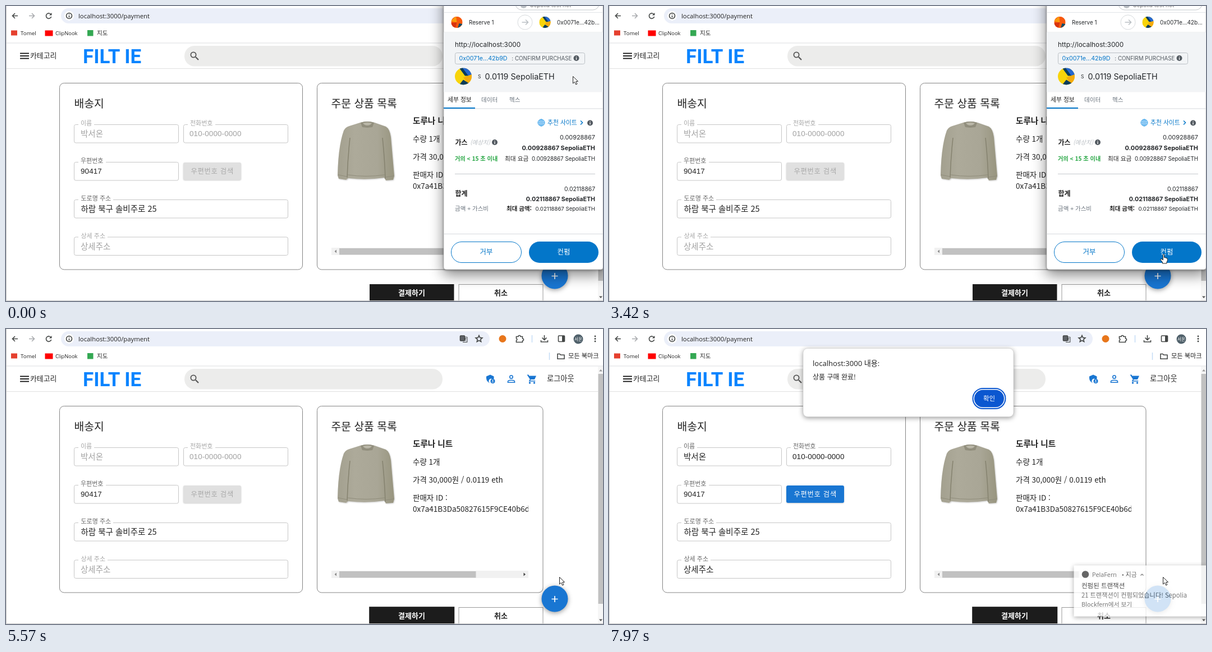
These frames come from a looping animation (1064x526 px, 8 s). An HTML page:

```html
<!DOCTYPE html>
<html lang="ko">
<head>
<meta charset="utf-8">
<title>Payment</title>
<style>
html, body { margin: 0; width: 100%; height: 100%; overflow: hidden; background: #fff; }
svg { display: block; width: 100vw; height: 100vh; }
text { font: 11px 'Noto Sans CJK KR', 'Noto Sans KR', 'Noto Sans CJK JP', sans-serif; fill: #222; white-space: pre; }
.ui { font-family: 'Open Sans', 'Noto Sans CJK KR', 'Noto Sans CJK JP', sans-serif; }
.wal { font-family: Inter, 'Noto Sans CJK KR', 'Noto Sans CJK JP', sans-serif; fill: #24272a; }
.num { font: 13.4px 'Liberation Sans', Arial, sans-serif; letter-spacing: .125px; }
.title { font-size: 19.3px; font-weight: 300; }
.item { font-size: 13.5px; font-weight: 300; }
.val { font-size: 14.5px; }
.lab { fill: #666; }
.b { font-weight: 700; }
.mid { text-anchor: middle; }
.end { text-anchor: end; }
.line { fill: none; stroke: #444746; stroke-width: 1.6; }
.box { fill: none; stroke: #c6c6c6; }
.soft { filter: drop-shadow(0 2px 4px #0006); }
.deep { filter: drop-shadow(0 1px 2px #0005) drop-shadow(0 9px 12px #0007); }

/* one loop is 8 s, so 1% is 80 ms */
.an { animation: 8s linear infinite; }
#cursor { animation-name: travel; }
#arrow { animation-name: arrow; }
#hand { animation-name: hand; }
#confirm { animation-name: confirm; }
#popup { animation-name: close; transform-origin: 923px 49px; }
#details { animation-name: details; }
#veil { animation-name: veil; }
#pay { animation-name: focus; }
.von { animation-name: valueOn; }
.lon { animation-name: labelOn; }
.bon { animation-name: buttonOn; }
.ton { animation-name: captionOn; }
#alert { animation-name: alert; }
#note { animation-name: note; }
.spoke { fill: #f6851b; animation: spoke 1s linear infinite; }

@keyframes travel {
  0%, 6.6% { transform: translate(1010px, 125px); animation-timing-function: ease-in-out; }
  16.25%, 17.1% { transform: translate(991px, 381px); animation-timing-function: ease-out; }
  21.875% { transform: translate(993px, 444px); }
  25.25%, 27.7% { transform: translate(992px, 454px); }
  29.4%, 69.6% { transform: translate(987px, 442px); }
  69.625%, 88.6% { transform: translate(986px, 442px); }
  88.625%, 100% { transform: translate(987px, 442px); }
}
@keyframes arrow { 0%, 40.99% { opacity: 1; } 41%, 62.49% { opacity: 0; } 62.5%, 100% { opacity: 1; } }
@keyframes hand { 0%, 40.99% { opacity: 0; } 41%, 62.49% { opacity: 1; } 62.5%, 100% { opacity: 0; } }
@keyframes confirm {
  0%, 11.8% { opacity: 1; } 14.4%, 40.1% { opacity: .26; }
  42.7%, 56.25% { opacity: 1; } 58.5%, 100% { opacity: .35; }
}
@keyframes veil { 0%, 56.24% { opacity: 0; } 58%, 100% { opacity: 1; } }
@keyframes details { 0%, 60.9% { opacity: 1; } 61%, 99.9% { opacity: 0; } 100% { opacity: 1; } }
@keyframes close {
  0%, 62.3% { opacity: 1; transform: none; }
  63.375% { opacity: .5; transform: scale(.982); }
  63.99% { opacity: .22; transform: scale(.972); }
  64%, 100% { opacity: 0; transform: scale(.972); }
}
@keyframes focus { 0%, 62.49% { stroke-width: 0; } 62.5%, 100% { stroke-width: 1.6px; } }
@keyframes valueOn { 0%, 93.62% { fill: #a2a2a2; } 93.63%, 100% { fill: #222; } }
@keyframes labelOn { 0%, 93.62% { fill: #a6a6a6; } 93.63%, 100% { fill: #666; } }
@keyframes buttonOn { 0%, 93.62% { fill: #e0e0e0; } 93.63%, 100% { fill: #1976d2; } }
@keyframes captionOn { 0%, 93.62% { fill: #a8a8a8; } 93.63%, 100% { fill: #fff; } }
@keyframes alert { 0%, 93.62% { opacity: 0; } 95.5%, 100% { opacity: 1; } }
@keyframes note {
  0%, 96.2% { opacity: 0; transform: translateX(70px); animation-timing-function: ease-out; }
  99.6%, 100% { opacity: .8; transform: none; }
}
@keyframes spoke { from { opacity: 1; } to { opacity: .03; } }
</style>
</head>
<body>
<svg viewBox="0 0 1064 526">
<defs>
  <clipPath id="round"><circle r="15"/></clipPath>
  <clipPath id="list"><rect x="720" y="190" width="211" height="150"/></clipPath>
  <clipPath id="panelClip"><path id="panel" d="M780-120H1064V466Q1064 470 1060 470H785Q780 470 780 465Z"/></clipPath>
  <linearGradient id="wool">
    <stop offset="0" stop-color="#a3a08f"/><stop offset=".3" stop-color="#adaa9a"/>
    <stop offset=".7" stop-color="#a9a696"/><stop offset="1" stop-color="#98957f"/>
  </linearGradient>
  <g id="sun" clip-path="url(#round)">
    <rect x="-15" y="-15" width="30" height="30" fill="#f8d40a"/>
    <path d="M-3-16 16-16 16-3 8-1Z" fill="#2467d1"/>
    <path d="M-8-16-2-16 9-1 3-1Z" fill="#0b3c5c"/>
    <path d="M0 2 16-4 16 12 8 13Z" fill="#f5ab0c"/>
    <path d="M-8 16 0 6 11 13 6 16Z" fill="#0b3c5c"/>
  </g>
  <g id="ember" clip-path="url(#round)">
    <rect x="-15" y="-15" width="30" height="30" fill="#f7590f"/>
    <path d="M-16-3-2-16 0 1Z" fill="#fa9a0c"/>
    <path d="M-16 2 0 0-4 16-16 16Z" fill="#d8330f"/>
    <path d="M2 16 6 3 16 5Z" fill="#0f4e6b"/>
  </g>
  <g id="info">
    <circle r="5" fill="#535a61"/><path d="M0-.8V3M0-3V-1.8" stroke="#fff" stroke-width="1.3"/>
  </g>
</defs>

<rect width="1064" height="526" fill="#fff"/>

<!-- browser bars -->
<g>
  <g class="line">
    <path d="M21 17.5H11.5M16 13l-4.5 4.5 4.5 4.5"/>
    <path d="M41 17.5h9.5M46 13l4.5 4.5-4.5 4.5" stroke="#a9abae"/>
    <path d="M80.3 15.3A4.7 4.7 0 1 0 80.7 19"/>
  </g>
  <path d="M81.5 12V16.5H77Z" fill="#444746"/>
  <rect x="98" y="4" width="764" height="27" rx="13.5" fill="#ebeff9"/>
  <circle cx="112.5" cy="17.5" r="8.5" fill="#fff"/>
  <circle cx="112.5" cy="17.5" r="5" class="line"/>
  <path d="M112.5 17V20.5M112.5 14.3v1.3" class="line"/>
  <text class="ui" x="129" y="21.5" style="font-size:11.3px">localhost:3000/payment</text>

  <g class="line">
    <rect x="809.5" y="12" width="8" height="9" rx="1" fill="#5f6368"/>
    <path d="M818 14.5h4v9h-8M816 17.5h5M818.5 16v1.5q-.5 2.500-2.500 4M817 18q1 2 3.500 3.500" stroke-width="1"/>
    <path d="M843 11.5l1.700 3.900 4.200.4-3.200 2.800 1 4.100-3.700-2.200-3.700 2.200 1-4.100-3.200-2.800 4.200-.4Z"/>
    <path d="M909.5 13.5h3.500a2 2 0 0 1 4 0h3.500v3.500a2 2 0 0 1 0 4v2.500h-11v-3a2 2 0 0 0 0-3.800Z"/>
    <path d="M959.5 11v8M955.5 15.5l4 4 4-4M953.5 20v3h12v-3"/>
    <rect x="984.5" y="12" width="11" height="10.5" rx="1"/>
    <path d="M983 44.5h4l1.500 1.800h6.500v7h-12Z"/>
  </g>
  <rect x="991" y="12" width="4.5" height="10.5" fill="#444746"/>
  <circle cx="885" cy="17.5" r="6.5" fill="#e8761b"/>
  <path d="M937.5 11v13M968.5 42v13" stroke="#c4dcf5" stroke-width="1.5"/>
  <circle cx="1020" cy="18" r="8.5" fill="#50616b"/>
  <text class="mid" x="1020" y="21" style="font-size:7.5px;fill:#fff">서온</text>
  <g fill="#444746"><circle cx="1050" cy="13" r="1.4"/><circle cx="1050" cy="17.5" r="1.4"/><circle cx="1050" cy="22" r="1.4"/></g>

  <rect x="9" y="43.5" width="11" height="9" fill="#e5402f"/>
  <text class="ui" x="26" y="51.5" style="font-size:9.8px">Tomel</text>
  <rect x="69.5" y="43.5" width="14" height="10" fill="#f00"/>
  <text class="ui" x="88" y="51.5" style="font-size:9.3px">ClipNook</text>
  <rect x="145" y="43" width="10.5" height="10.5" fill="#34a853"/>
  <text x="162" y="52" style="font-size:10.5px">지도</text>
  <text x="1002" y="52" style="font-size:11.2px">모든 북마크</text>
  <path d="M0 66H1064" stroke="#dcdde0"/>
</g>

<!-- shop header -->
<g>
  <path d="M25 84.5h16M25 89h16M25 93.5h16" stroke="#222" stroke-width="1.8"/>
  <text x="43" y="93.3" style="font-size:12.9px">카테고리</text>
  <text x="137" y="102" style="font:700 35px Roboto,sans-serif;fill:#0a84ff">FILT IE</text>
  <rect x="318" y="71" width="460" height="36.5" rx="18" fill="#ececeb"/>
  <path d="M338 91l5 5" stroke="#555" stroke-width="2.2"/>
  <circle cx="334" cy="87" r="4.6" fill="none" stroke="#555" stroke-width="1.8"/>
  <g fill="#1976d2">
    <path d="M856 84.5l7-3 6.500 3v4.500h-3.500a4 4 0 0 0-3 7.500q-6.500-2-7-8.500Z"/>
    <circle cx="867.5" cy="93" r="4"/>
    <path d="M928.5 81.5h3l.8 2h12.700l-3 6.500h-6.800l-1 2h9v1.500h-11.500l2-4Z"/>
    <circle cx="933.5" cy="96" r="1.7"/><circle cx="941.5" cy="96" r="1.7"/>
  </g>
  <circle cx="867.5" cy="91.7" r="1.1" fill="#fff"/><path d="M865.3 95q2.200-2.400 4.400 0" fill="#fff"/>
  <circle cx="900.5" cy="85.5" r="2.7" fill="none" stroke="#1976d2" stroke-width="1.6"/>
  <path d="M894.5 95.2v-1.500q0-2.500 6-2.500t6 2.500v1.500Z" fill="none" stroke="#1976d2" stroke-width="1.6"/>
  <text x="964" y="92.5" style="font-size:13.2px">로그아웃</text>
  <path d="M0 111.5H1055" stroke="#e0e0e0"/>
</g>

<!-- address card -->
<rect x="95.5" y="137.5" width="433" height="332.5" rx="8" fill="#fff" stroke="#858585"/>
<text class="title" x="121.5" y="180.5">배송지</text>
<g class="box">
  <rect x="121.5" y="211.5" width="186" height="32.5" rx="3"/>
  <rect x="316.5" y="211.5" width="186" height="32.5" rx="3"/>
  <rect x="121.5" y="278.5" width="186" height="32.5" rx="3"/>
  <rect x="121.5" y="345.5" width="381" height="32.5" rx="3"/>
  <rect x="121.5" y="412" width="381" height="32.5" rx="3"/>
</g>
<path d="M129 211.5h28M324 211.5h49M129 278.5h49M129 345.5h62M129 412h52" stroke="#fff" stroke-width="3"/>
<text class="an lon" x="133" y="213">이름</text>
<text class="an lon" x="328" y="213">전화번호</text>
<text class="lab" x="133" y="280">우편번호</text>
<text class="lab" x="133.5" y="347">도로명 주소</text>
<text class="an lon" x="133.5" y="414">상세 주소</text>
<text class="val an von" x="133" y="233">박서온</text>
<text class="num an von" x="327" y="232">010-0000-0000</text>
<text class="num" x="133" y="299">90417</text>
<text class="val" x="133.5" y="367">하람 북구 솔비주로 25</text>
<text class="val an von" x="133" y="433.5">상세주소</text>
<rect class="an bon" x="316" y="279" width="103" height="31" rx="3" style="filter:drop-shadow(0 1px 1px #0003)"/>
<text class="mid an ton" x="367.7" y="298.5" style="font-size:12.3px;letter-spacing:.75px">우편번호 검색</text>

<!-- order card -->
<rect x="554.5" y="137.5" width="402.5" height="332.5" rx="8" fill="#fff" stroke="#858585"/>
<text class="title" x="579.5" y="180.5">주문 상품 목록</text>
<g style="filter:drop-shadow(1px 1px 1px #0003)">
  <path d="M631 208Q644 204 657 208L677 215Q684 219 686 234L692 303 690 310 677 311 674 306Q642 311 610 307L606 310 593 308 591 302Q592 250 602 222 605 216 612 214Z" fill="url(#wool)"/>
  <path d="M632 208Q644 204 656 208L653 216 644 217 635 216Z" fill="#918e7d"/>
  <path d="M636 209Q644 206 652 209 649 213 644 213 639 213 636 209Z" fill="#b9b6a7"/>
  <path d="M613 235Q609 272 608 306M671 235Q675 274 676 308" fill="none" stroke="#85826f" stroke-width="1.5"/>
  <path d="M609 301Q642 306 675 301M592 301l15 3M677 305l14-2" fill="none" stroke="#8f8c7a"/>
</g>
<g clip-path="url(#list)">
  <text class="b" x="725" y="209.5" style="font-size:14.6px">도루나 니트</text>
  <text class="item" x="725" y="242">수량 1개</text>
  <text class="item" x="725" y="274">가격 30,000원 / 0.0119 eth</text>
  <text class="item" x="725" y="306">판매자 ID :</text>
  <text class="item" x="725" y="326">0x7a41B3Da50827615F9CE40b6d</text>
</g>
<rect x="580" y="431" width="351" height="13" fill="#f1f1f1"/>
<rect x="594" y="432" width="243.5" height="11.5" fill="#c1c1c1"/>
<path d="M589 434.5v6l-3.500-3Z" fill="#8b8b8b"/><path d="M922.5 434.5v6l3.500-3Z" fill="#444"/>

<rect id="pay" class="an" x="648" y="496" width="150.5" height="40" fill="#1c1c1c" stroke="#1c1c1c"/>
<text class="mid b" x="723" y="516" style="font-size:13px;fill:#fff">결제하기</text>
<rect x="807" y="496.5" width="150" height="32" fill="#fff" stroke="#999"/>
<text class="mid b" x="882" y="516" style="font-size:13px">취소</text>

<rect x="1055" y="67" width="9" height="459" fill="#f6f6f6"/>
<rect x="1055.5" y="80" width="8.5" height="410" fill="#c1c1c1"/>
<path d="M1057 75.5h6l-3-3.500Z" fill="#999"/><path d="M1057 517.5h6l-3 3.500Z" fill="#555"/>
<g class="soft"><circle cx="978" cy="481" r="23.5" fill="#1976d2"/></g>
<path d="M972.5 481.5h11M978 476v11" stroke="#fff" stroke-width="1.7"/>
<path d="M.5 0V525.5H1064" fill="none" stroke="#c8c8c8"/>

<!-- wallet window -->
<g id="popup" class="an">
  <g class="deep"><use href="#panel" fill="#fff" stroke="#aaa" stroke-width=".7"/></g>
  <g clip-path="url(#panelClip)">
    <g id="details" class="an">
      <rect x="908" y="-16" width="149" height="23" rx="11" fill="#fff" stroke="#c3c7cb"/>
      <circle cx="922.5" cy="-2" r="6" fill="#bbc0c5"/>
      <text class="wal" x="934" y="1.5" style="font-size:10px;fill:#777">Sepolia test net</text>
      <path d="M780 11.5H1064M780 47H1064" stroke="#e1e4e7"/>
      <use href="#ember" transform="translate(803.5 29) scale(.68)"/>
      <text class="wal" x="825" y="32.5" style="font-size:9.8px">Reserve 1</text>
      <circle cx="925" cy="29" r="13" fill="#fff" stroke="#d6d9dc"/>
      <path d="M919.5 29h11M926 24.5l4.500 4.500-4.500 4.500" fill="none" stroke="#bbc0c5" stroke-width="1.6"/>
      <use href="#sun" transform="translate(960.5 29) scale(.68)"/>
      <text class="wal" x="982" y="32.5" style="font-size:10px">0x0071e...42b...</text>

      <rect x="780" y="47" width="284" height="106.5" fill="#f2f4f6"/>
      <text class="wal" x="800" y="72.5" style="font-size:11.8px">http://localhost:3000</text>
      <rect x="800.5" y="83.5" width="231" height="20" rx="3" fill="none" stroke="#bbc0c5"/>
      <text class="wal" x="807.5" y="97" style="font-size:10.7px;fill:#0376c9">0x0071e...42b9D</text>
      <text class="wal end" x="1008.5" y="97" style="font-size:9.8px;fill:#535a61">: CONFIRM PURCHASE</text>
      <use href="#info" x="1016.5" y="93"/>
      <use href="#sun" x="815" y="125.5"/>
      <text class="wal" x="841" y="128.5" style="font-size:8.5px">S</text>
      <text class="wal" x="853.5" y="131" style="font-size:14.3px">0.0119 SepoliaETH</text>

      <text x="787" y="171" style="font-size:10.8px">세부 정보</text>
      <text x="847" y="171" style="font-size:10.6px;fill:#6a737d">데이터</text>
      <text x="897" y="171" style="font-size:10.6px;fill:#6a737d">헥스</text>
      <path d="M780 183H1064" stroke="#d6d9dc"/><path d="M780 182H836" stroke="#0376c9" stroke-width="2"/>

      <circle cx="954" cy="208" r="6" fill="#cfe8fb" stroke="#2b9be8"/>
      <path d="M948 208h12M954 202v12M949.5 205h9M949.5 211h9" stroke="#2b9be8" stroke-width=".7"/>
      <ellipse cx="954" cy="208" rx="3" ry="6" fill="none" stroke="#2b9be8" stroke-width=".7"/>
      <text x="965" y="211.7" style="font-size:10.8px;fill:#0376c9">추천 사이트</text>
      <path d="M1024 204.5l3.500 3.500-3.500 3.500" fill="none" stroke="#0376c9" stroke-width="1.5"/>
      <use href="#info" x="1041" y="208.5"/>

      <text class="b" x="800.5" y="247.5" style="font-size:12px">가스</text>
      <text x="827" y="247" style="font-size:10.5px;font-style:italic;fill:#bbc0c5">(예상치)</text>
      <use href="#info" x="871" y="243"/>
      <text class="b" x="800" y="275.5" style="font-size:10.2px;fill:#28a745">거의 &lt; 15 초 이내</text>
      <text x="889" y="275.5" style="font-size:10.7px">최대 요금</text>
      <g class="end">
        <text class="wal" x="1050" y="238" style="font-size:10.9px">0.00928867</text>
        <text class="wal b" x="1050" y="257" style="font-size:10.9px">0.00928867 SepoliaETH</text>
        <text class="wal" x="1050" y="275.5" style="font-size:9.8px">0.00928867 SepoliaETH</text>
        <text class="wal" x="1050" y="329.5" style="font-size:10.3px">0.02118867</text>
        <text class="wal b" x="1050" y="348" style="font-size:10.7px">0.02118867 SepoliaETH</text>
        <text class="wal" x="1050" y="364.7" style="font-size:9.6px">0.02118867 SepoliaETH</text>
      </g>
      <path d="M800 299.5H1050" stroke="#c5c9cd"/>
      <text class="b" x="800.5" y="339" style="font-size:12px">합계</text>
      <text x="800" y="364.7" style="font-size:10.5px;fill:#6a737d">금액 + 가스비</text>
      <text class="b" x="892" y="364.7" style="font-size:10.5px">최대 금액:</text>

      <path d="M780 406.5H1064" stroke="#d6d9dc"/>
      <rect x="793.5" y="420.5" width="125" height="37" rx="18.5" fill="#fff" stroke="#0376c9"/>
      <text class="mid" x="856" y="442.5" style="font-size:12.4px;fill:#0376c9">거부</text>
      <g id="confirm" class="an">
        <rect x="932" y="420" width="124" height="38" rx="19" fill="#0376c9"/>
        <text class="mid" x="994" y="442.5" style="font-size:12.4px;fill:#fff">컨펌</text>
      </g>
    </g>
    <g id="veil" class="an">
      <rect x="780" y="0" width="284" height="470" fill="#f4f6f8" opacity=".78"/>
      <g id="spinner" transform="translate(924 222.5)"></g>
    </g>
  </g>
</g>

<!-- alert -->
<g id="alert" class="an">
  <rect class="soft" x="346" y="34.5" width="375" height="122" rx="8" fill="#fff" stroke="#ccc" stroke-width=".6"/>
  <text class="ui" x="363" y="66" style="font-size:13.1px">localhost:3000 내용:</text>
  <text x="363" y="90" style="font-size:12px">상품 구매 완료!</text>
  <rect x="648.5" y="106" width="58" height="36" rx="18" fill="#fff" stroke="#0b57d0" stroke-width="2"/>
  <rect x="651" y="108.5" width="53" height="31" rx="15.5" fill="#0b57d0"/>
  <text class="mid" x="677.5" y="128" style="font-size:11.5px;fill:#fff">확인</text>
</g>

<!-- notification -->
<g id="note" class="an">
  <rect class="soft" x="828.5" y="421.5" width="240" height="91" fill="#fff"/>
  <circle cx="849" cy="437.5" r="6.3" fill="#444"/>
  <text class="ui" x="861" y="441.5" style="font-size:10.8px;fill:#555">PelaFern</text>
  <text x="914" y="441.5" style="font-size:10.8px;fill:#555">• 지금</text>
  <path d="M947.5 439.5l2.500-2.500 2.500 2.500" fill="none" stroke="#555" stroke-width="1.2"/>
  <text x="842" y="462" style="font-size:11.5px">컨펌된 트랜잭션</text>
  <text x="842" y="479" style="font-size:11.2px;fill:#555">21 트랜잭션이 컨펌되었습니다! Sepolia</text>
  <text x="842" y="495" style="font-size:10.7px;fill:#555">Blockfern에서 보기</text>
</g>

<!-- pointer -->
<g id="cursor" class="an" fill="#fff" stroke="#222" stroke-linejoin="round">
  <path id="arrow" class="an" d="M.5.5V13L3.5 10.3 5.7 15 7.9 14 5.8 9.5 9.5 9.3Z"/>
  <path id="hand" class="an" d="M.3 1Q1.5-.6 2.5 1V6.5Q4.5 5.5 5 7.2 6.5 6.3 7 8 8.5 7.5 8.5 9.5 8.5 13 7 14.5V17H-.5V15L-4 10.5Q-4 8.5-2 9L.3 11Z"/>
</g>
</svg>
<script>
const spinner = document.getElementById('spinner');
for (let i = 0; i < 12; i++) {
  const spoke = document.createElementNS('http://www.w3.org/2000/svg', 'rect');
  const attrs = { class: 'spoke', x: -2.2, y: -24.5, width: 4.4, height: 14.5, rx: 1.5, transform: `rotate(${i * 30})` };
  for (const name in attrs) spoke.setAttribute(name, attrs[name]);
  spoke.style.animationDelay = `${i / 12 - 1.143}s`;
  spinner.append(spoke);
}
</script>
</body>
</html>
```
